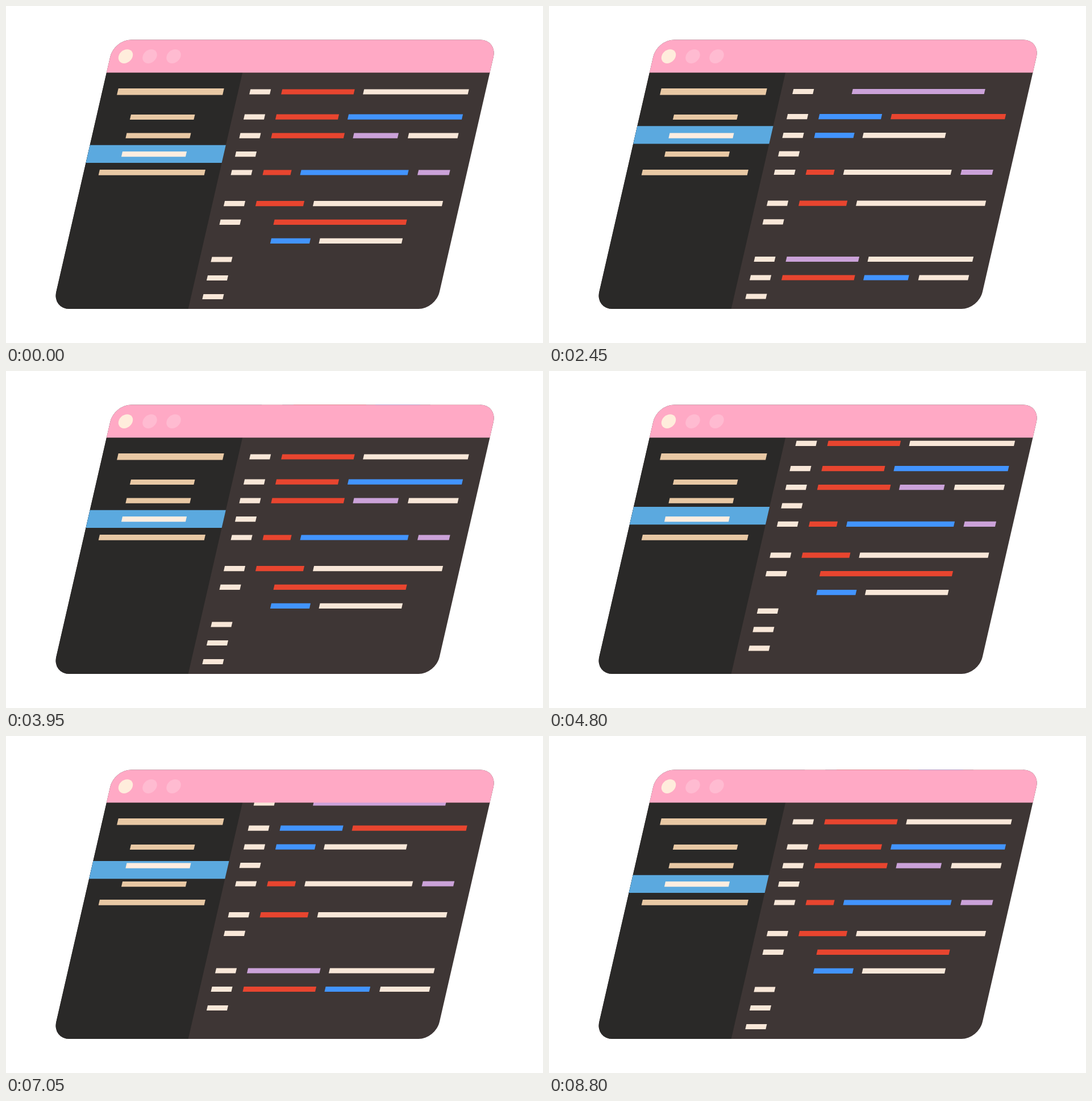
Recreate the animation shown at these times as an HTML page. Size 945 px wide and 593 px high, loop 8.85 s.

```html
<!DOCTYPE html>
<html lang="en">
<head>
<meta charset="utf-8">
<title>Code editor</title>
<style>
  html, body { margin: 0; width: 100%; height: 100%; overflow: hidden; background: #fff; }
  svg { display: block; width: 945px; height: 593px; }
</style>
</head>
<body>
<svg viewBox="0 0 945 593">
  <defs>
    <clipPath id="panel"><rect x="177" y="59.5" width="674.5" height="473.5" rx="30"/></clipPath>
  </defs>
  <!-- x is measured along y = 117, then slanted -->
  <g transform="matrix(1 0 -.2296 1 26.86 0)">
    <g clip-path="url(#panel)">
      <rect x="170" y="50" width="690" height="490" fill="#3e3635"/>
      <g id="code"></g>
      <rect x="170" y="117" width="246.2" height="420" fill="#2a2928"/>
      <rect id="mark" x="170" width="246.2" height="31.3" fill="#5ba9df"/>
      <g id="side"></g>
      <rect x="170" y="50" width="690" height="67.3" fill="#ffa9c5"/>
      <circle cx="204" cy="88.6" r="12.4" fill="#ffeddc"/>
      <circle cx="246.5" cy="88.6" r="12.4" fill="#ffbbd1"/>
      <circle cx="288.5" cy="88.6" r="12.4" fill="#ffbbd1"/>
    </g>
  </g>
</svg>
<script>
const LOOP = 8850, CYCLE = LOOP / 2, STEP = 50;
const HEIGHT = 416;              // one page of code
const STAGGER = 60, GROW = 414;  // bar growth, ms
const TO_B = { start: 154, scroll: 913, mark: 628, grow: 586 };
const TO_A = { start: 2392, scroll: 861, mark: 575, grow: 2686 };
const MARK_A = 244.8, MARK_B = 211;

const CREAM = '#f8e7d8', RED = '#e8452f', BLUE = '#4294ff', LILAC = '#cba2d9';
const SAND = '#e8c8a4', ACTIVE = '#ffede0';

const rows = [151, 195.2, 228.2, 260.7, 293, 347.7, 380.3, 413.3, 446, 478.5, 511.5];
const numbered = [0, 1, 2, 3, 4, 5, 6, 8, 9, 10];

// row, x, width, colour
const codeA = [
  [0, 493, 127.5, RED], [0, 637, 184.5, CREAM],
  [1, 493, 110, RED], [1, 620, 201, BLUE],
  [2, 493, 127.5, RED], [2, 637, 78.5, LILAC], [2, 733.6, 87.5, CREAM],
  [4, 493, 49, RED], [4, 559, 189, BLUE], [4, 765.5, 55.5, LILAC],
  [5, 493, 84, RED], [5, 594, 227, CREAM],
  [6, 532, 233, RED],
  [7, 534, 69, BLUE], [7, 619.6, 145.5, CREAM]
];
const codeB = [
  [0, 541.4, 233, LILAC],
  [1, 493, 110, BLUE], [1, 620, 201, RED],
  [2, 493, 69, BLUE], [2, 578, 145, CREAM],
  [4, 493, 49, RED], [4, 559, 189, CREAM], [4, 765.5, 55.5, LILAC],
  [5, 493, 84, RED], [5, 594, 227, CREAM],
  [8, 493, 127.5, LILAC], [8, 637, 184.5, CREAM],
  [9, 493, 127.5, RED], [9, 637, 78.5, BLUE], [9, 733.6, 87.5, CREAM]
];

const clamp = v => Math.min(1, Math.max(0, v));

function inOut(v) {
  const x = clamp(v);
  return x < .5 ? 4 * x ** 3 : 1 - 4 * (1 - x) ** 3;
}

// cubic-bezier(.16, 1, .8, 1)
function easeOut(v) {
  const x = clamp(v);
  if (x === 0 || x === 1) return x;
  let lo = 0, hi = 1;
  for (let i = 0; i < 24; i++) {
    const s = (lo + hi) / 2, r = 1 - s;
    if (3 * r * r * s * .16 + 3 * r * s * s * .8 + s ** 3 < x) lo = s; else hi = s;
  }
  return 1 - (1 - lo) ** 3;
}

const byId = id => document.getElementById(id);

function make(parent, tag, attrs) {
  const el = document.createElementNS('http://www.w3.org/2000/svg', tag);
  for (const k in attrs) el.setAttribute(k, attrs[k]);
  return parent.appendChild(el);
}

const bar = (parent, x, mid, width, fill, height = 9.2) =>
  make(parent, 'rect', { x, y: mid - height / 2, width, height, fill });

function makePage(segments, firstSlot) {
  const group = make(byId('code'), 'g', {});
  const bars = [];
  numbered.forEach((row, slot) =>
    bars.push({ el: bar(group, 437, rows[row], 0, CREAM), width: 36, slot }));
  segments.forEach(([row, x, width, fill], i) =>
    bars.push({ el: bar(group, x, rows[row], 0, fill), width, slot: i + firstSlot }));
  return (offset, age) => {
    group.setAttribute('transform', `translate(0 ${offset})`);
    for (const b of bars)
      b.el.setAttribute('width', b.width * easeOut((age - b.slot * STAGGER) / GROW));
  };
}

const pageA = makePage(codeA, 0), pageB = makePage(codeB, 1);
const side = byId('side'), mark = byId('mark');
bar(side, 204.2, 150.8, 186, SAND, 11.4);
bar(side, 237, 195.5, 112.5, SAND);
const itemB = bar(side, 237, 228.2, 113, SAND);
const itemA = bar(side, 237, 260.6, 113, SAND);
bar(side, 204.2, 292.8, 186, SAND, 9.8);

function draw(time) {
  const t = time % CYCLE, back = t >= TO_A.start;
  const move = (go, key) => inOut((t - go.start) / go[key]);
  if (back) {
    const p = move(TO_A, 'scroll');
    pageB(-HEIGHT * p, Infinity);
    pageA(HEIGHT * (1 - p), t - TO_A.grow);
  } else {
    const p = move(TO_B, 'scroll');
    pageA(-HEIGHT * p, Infinity);
    pageB(HEIGHT * (1 - p), t - TO_B.grow);
  }
  const onB = back ? 1 - move(TO_A, 'mark') : move(TO_B, 'mark');
  mark.setAttribute('y', MARK_A + (MARK_B - MARK_A) * onB);
  itemA.setAttribute('fill', onB < .5 ? ACTIVE : SAND);
  itemB.setAttribute('fill', onB < .5 ? SAND : ACTIVE);
}

const begin = performance.now();
function tick() {
  const t = (performance.now() - begin) % LOOP;
  draw(Math.floor(t / STEP) * STEP);
  requestAnimationFrame(tick);
}
tick();
</script>
</body>
</html>
```
